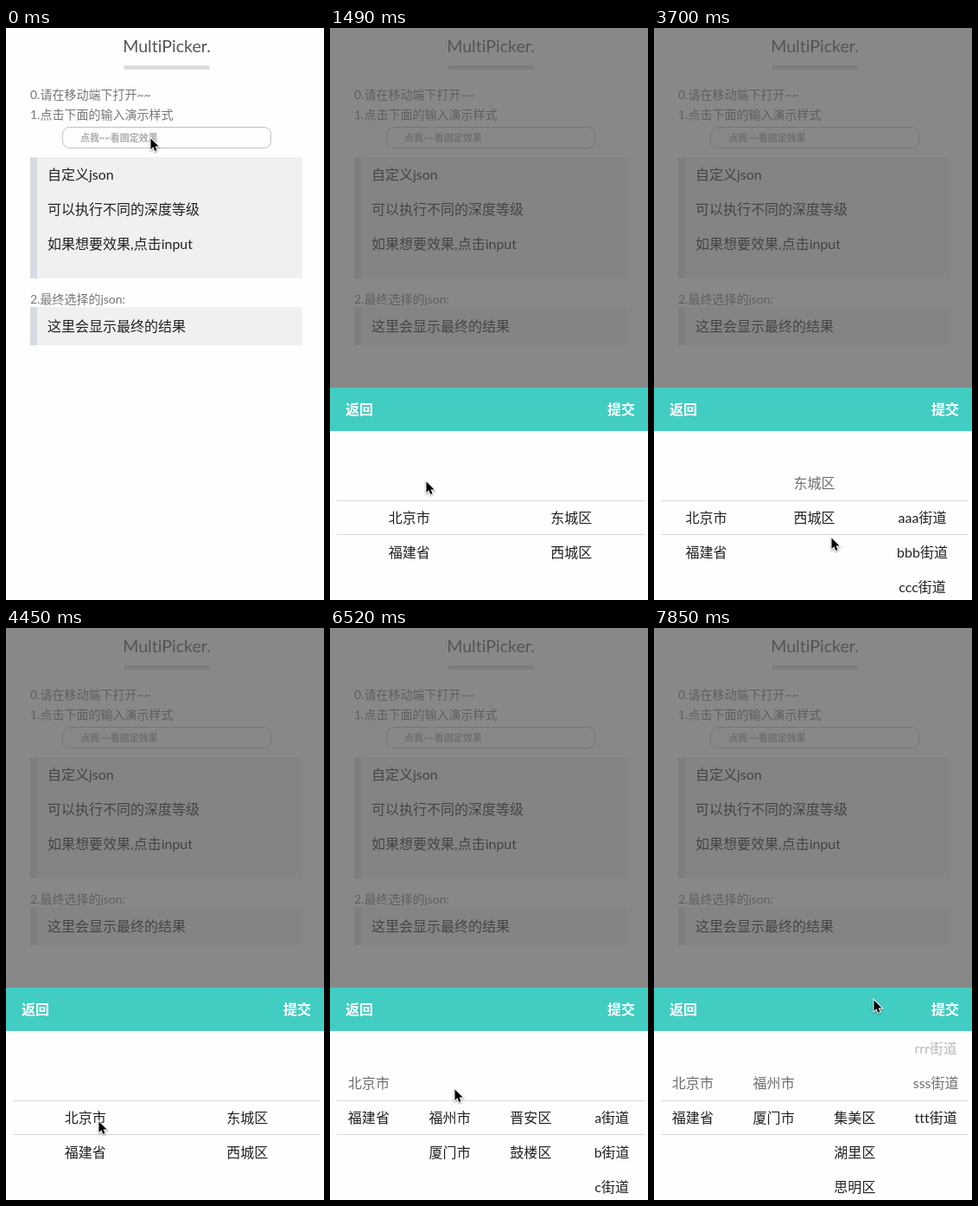
An HTML page with a canvas for the animation above (7.99 s loop, 368 by 660 pixels).

```html
<!DOCTYPE html>
<html lang="zh-CN">
<head>
<meta charset="utf-8">
<title>MultiPicker</title>
<style>
html, body { margin: 0; width: 100%; height: 100%; overflow: hidden; background: #fefefe; }
canvas { display: block; }
</style>
</head>
<body>
<canvas id="stage" width="368" height="660"></canvas>
<script>
const ctx = document.getElementById('stage').getContext('2d');
ctx.textRendering = 'optimizeSpeed'; // no ligatures
const FONT = 'Lato, "Noto Sans CJK SC", "Noto Sans CJK", sans-serif';
const LOOP = 7990, TICK = 148, ROW = 40;
const OPEN_AT = 4.06, OPEN_TICKS = 2, RELAYOUT_TICKS = 3, SCROLL_TICKS = 4;

const streets = names => names.split(' ').map(name => name + '街道');
const provinces = ['北京市', '福建省'];
const beijing = [provinces, ['东城区', '西城区']];
const xicheng = [...beijing, streets('aaa bbb ccc')];
const fujian = [provinces, ['福州市', '厦门市']];
const fuzhou = [...fujian, ['晋安区', '鼓楼区'], streets('a b c')];
const xiamen = [...fujian, ['集美区', '湖里区', '思明区'], streets('rrr sss ttt')];

// Each pick scrolls one column by some rows; (x, y) is where the drag ends.
const picks = [
  { at: 17, column: 1, rows: 1, x: 272, y: 555, result: xicheng },
  { at: 25, column: 1, rows: -1, x: 205, y: 588, result: beijing },
  { at: 33, column: 0, rows: 1, x: 89, y: 526, result: fuzhou },
  { at: 44, column: 1, rows: 1, x: 144, y: 532, result: [...xiamen, streets('xxx')] },
  { at: 49, column: 3, rows: 2, x: 256, y: 530, result: xiamen }
];

// Drag towards the end point, then rest there before moving on.
const cursorStops = [
  [8, 167, 127], [10, 111, 523], [13, 100, 545],
  ...picks.flatMap(({ at, x, y, rows }) => [[at - 2, x, y + rows * ROW], [at, x, y], [at + 2, x, y]]),
  [53, 254, 429]
];

const clamp = u => Math.min(1, Math.max(0, u));
const mix = (a, b, u) => a + (b - a) * u;
const smooth = u => u * u * (3 - 2 * u);
const easeOutBack = u => 1 + 2.7 * (u - 1) ** 3 + 1.7 * (u - 1) ** 2;

function cursorAt(tick) {
  const next = cursorStops.findIndex(stop => stop[0] > tick);
  if (next < 0) return cursorStops.at(-1).slice(1);
  const to = cursorStops[next], from = cursorStops[next - 1] || to;
  const u = smooth(clamp((tick - from[0]) / (to[0] - from[0] || 1)));
  return [mix(from[1], to[1], u), mix(from[2], to[2], u)];
}

function scrollOf(column, tick) {
  return picks.filter(pick => pick.column === column)
    .reduce((sum, { at, rows }) => sum + rows * ROW * easeOutBack(clamp((tick - at) / SCROLL_TICKS)), 0);
}

function layoutAt(tick) {
  const done = picks.filter(pick => tick > pick.at);
  const pick = done.at(-1);
  if (!pick) return { columns: beijing, width: 375 / beijing.length };
  const columns = pick.result;
  const before = done.length > 1 ? done.at(-2).result : beijing;
  const u = clamp((tick - pick.at - 1) / RELAYOUT_TICKS);
  return {
    columns: u < 1 ? columns.slice(0, pick.column + 2) : columns,
    width: mix(375 / before.length, 375 / columns.length, u)
  };
}

function rect(x, y, w, h, color) {
  ctx.fillStyle = color;
  ctx.fillRect(x, y, w, h);
}

function text(str, x, centerY, size, color, align = 'left', weight = 400) {
  ctx.font = `${weight} ${size}px ${FONT}`;
  ctx.textAlign = align;
  ctx.fillStyle = color;
  ctx.fillText(str, x, Math.round(centerY + size * .37));
}

function block(y, h, lines, firstY) {
  rect(28, y, 315, h, '#f0f0f0');
  rect(28, y, 8, h, '#d5dbe0');
  lines.forEach((line, i) => text(line, 48, firstY + i * ROW, 16, '#222'));
}

function drawPage() {
  rect(0, 0, 368, 660, '#fefefe');
  text('MultiPicker.', 186, 21, 19.6, '#555', 'center');
  ctx.fillStyle = '#ddd';
  ctx.beginPath();
  ctx.roundRect(136, 43, 100, 5, 2.5);
  ctx.fill();
  text('0.请在移动端下打开~~', 28, 77, 14, '#777');
  text('1.点击下面的输入演示样式', 28, 100, 14, '#777');
  ctx.strokeStyle = '#c0c0c0';
  ctx.lineWidth = 1;
  ctx.beginPath();
  ctx.roundRect(65.5, 114.5, 241, 24, 8);
  ctx.stroke();
  text('点我~~看固定效果', 86, 127, 11, '#aaa', 'left', 700);
  block(149, 140, ['自定义json', '可以执行不同的深度等级', '如果想要效果,点击input'], 169);
  text('2.最终选择的json:', 28, 313, 14, '#777');
  block(322, 44, ['这里会显示最终的结果'], 344);
}

function drawPicker(tick, top) {
  rect(0, top, 368, 245, '#fefefe');
  const { columns, width } = layoutAt(tick);
  columns.forEach((items, c) => items.forEach((item, i) => {
    const offset = i * ROW - scrollOf(c, tick);
    const rowsAbove = Math.max(0, Math.round(-offset / ROW));
    ctx.globalAlpha = 1 - .35 * rowsAbove;
    text(item, width * (c + .5) - 2, top + 150 + offset, 16, '#222', 'center');
  }));
  ctx.globalAlpha = 1;
  rect(8, top + 130, 356, 1, '#d9d9d9');
  rect(8, top + 169, 356, 1, '#d9d9d9');
  rect(0, top, 368, 50, '#41cdc2');
  text('返回', 18, top + 25, 16, '#fff', 'left', 700);
  text('提交', 353, top + 25, 16, '#fff', 'right', 700);
}

const arrow = new Path2D('M.5 .5V13L3.4 10.3 5.3 15 7.5 14 5.6 9.5H9.6Z');
function drawCursor(x, y) {
  ctx.save();
  ctx.translate(Math.round(x), Math.round(y));
  ctx.shadowColor = 'rgba(0,0,0,.4)';
  ctx.shadowBlur = 2;
  ctx.shadowOffsetY = 1;
  ctx.strokeStyle = '#fff';
  ctx.lineWidth = 2;
  ctx.stroke(arrow);
  ctx.shadowColor = 'transparent';
  ctx.fillStyle = '#000';
  ctx.fill(arrow);
  ctx.restore();
}

const start = performance.now();
function draw() {
  const tick = Math.floor((performance.now() - start) % LOOP / TICK);
  const opened = clamp((tick - OPEN_AT) / OPEN_TICKS);
  drawPage();
  rect(0, 0, 368, 660, `rgba(85,85,85,${.69 * opened})`);
  drawPicker(tick, Math.round(mix(660, 415, opened)));
  drawCursor(...cursorAt(tick));
  requestAnimationFrame(draw);
}
draw();
</script>
</body>
</html>
```
